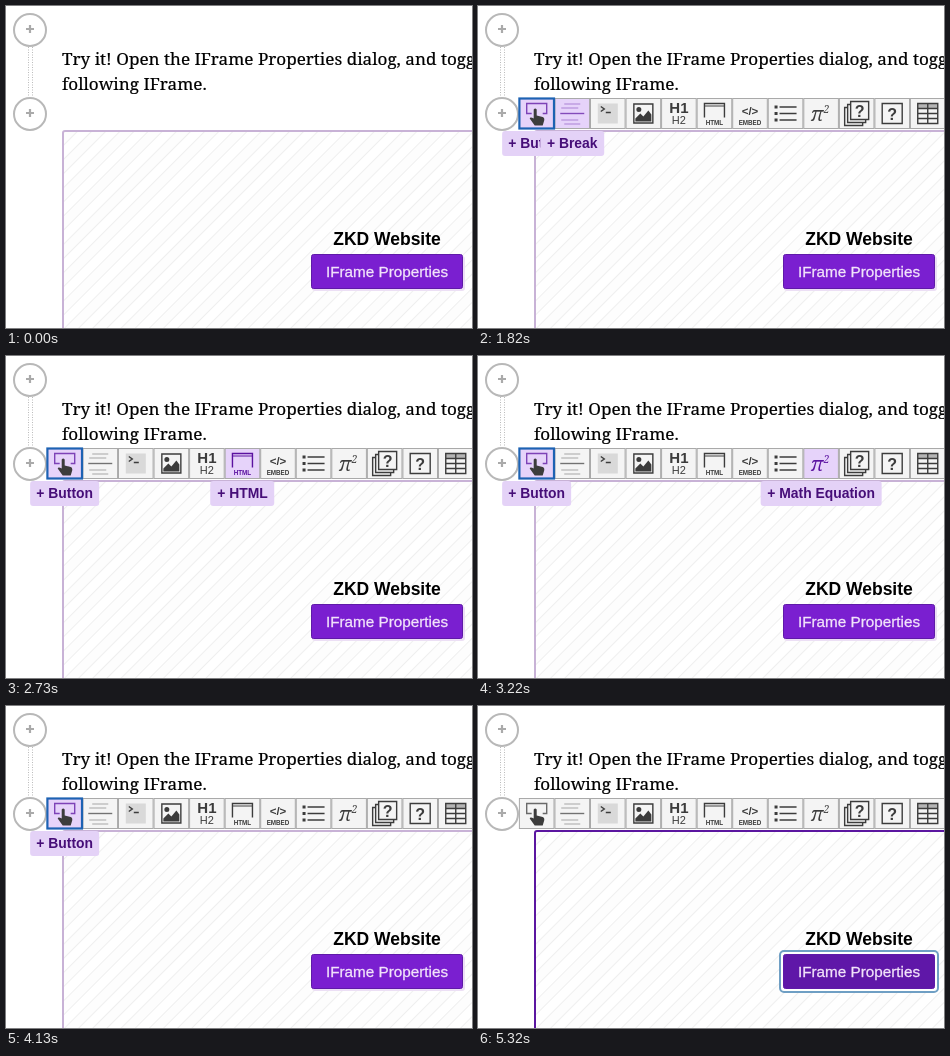
An HTML page for the animation above (5390 ms loop, 466x322 px).

```html
<!DOCTYPE html>
<html lang="en">
<head>
<meta charset="utf-8">
<title>Editor toolbar</title>
<style>
html, body { margin: 0; width: 100%; height: 100%; overflow: hidden; background: #fff; }
#stage { position: absolute; left: 0; top: 0; width: 466px; height: 322px; overflow: hidden; }
svg { position: absolute; left: 0; top: 0; }
.body { font: 17.1px "Noto Serif", serif; fill: #000; stroke: #000; stroke-width: .2; }
.ui { font-family: "Liberation Sans", Arial, sans-serif; text-anchor: middle; }
.tip {
  position: absolute; top: 125px; height: 25px; padding: 0 6.5px; border-radius: 3px;
  transform: translateX(-50%); white-space: nowrap; background: #e4d2f7; color: #460e78;
  font: bold 13.9px/25px "Liberation Sans", Arial, sans-serif;
}
.tool { color: #3c3c3c; }
.tool > rect { fill: #f4f4f4; stroke: #a9a9a9; }
.tool.hot { color: #5b12a0; }
.tool.hot > rect { fill: #e6d3fa; }
.tool.focus > rect { stroke: #1d62b3; stroke-width: 2.2; }
.tool text { fill: currentColor; }
.line { fill: none; stroke: currentColor; stroke-width: 1.4; }
.solid { fill: currentColor; }
.hand { fill: #3c3c3c; }
</style>
</head>
<body>
<div id="stage">
  <svg width="466" height="322" viewBox="0 0 466 322">
    <defs>
      <pattern id="hatch" width="20" height="20" patternUnits="userSpaceOnUse" patternTransform="translate(57 125) rotate(45)">
        <rect width="10" height="20" fill="#fdfdfd"/>
        <path d="M.5 0V20M10.5 0V20" stroke="#efefef"/>
      </pattern>
      <g id="plus">
        <circle r="16" fill="#fff" stroke="#b8b8b8" stroke-width="2"/>
        <path d="M-4-1H4M0-5V3" stroke="#aaa" stroke-width="2.2"/>
      </g>
    </defs>
    <path d="M22.5 41V91M26.5 41V91" stroke="#bbb" stroke-dasharray="1 1.5"/>
    <use href="#plus" x="24" y="24"/>
    <use href="#plus" x="24" y="108"/>
    <text class="body" x="56" y="59">Try it! Open the IFrame Properties dialog, and toggle the</text>
    <text class="body" x="56" y="84">following IFrame.</text>
    <path id="caret" d="M56.5 41V64" stroke="#000"/>
    <rect id="frame" x="57" y="125" width="500" height="260" rx="2" fill="url(#hatch)" stroke-width="2"/>
    <text class="ui" x="381" y="239" font-size="17.5" font-weight="bold">ZKD Website</text>
    <rect id="ring" x="302" y="245" width="158" height="41" rx="4" fill="#fff" stroke="#6f9fc4" stroke-width="2"/>
    <rect id="shade" x="306" y="250" width="153" height="35" rx="3" fill="#ecdff5"/>
    <rect id="action" x="305.5" y="248.5" width="151" height="34" rx="2" stroke="#5f1aa8"/>
    <text class="ui" x="381" y="271" font-size="15.25" fill="#f2e4fa" stroke="#f2e4fa" stroke-width=".3">IFrame Properties</text>
    <g id="bar"></g>
  </svg>
</div>
<script>
const LOOP = 5390, STEP = 70, PITCH = 35.55, FIRST = 58.7;
const $ = id => document.getElementById(id);
const label = (text, y, size, extra = '') =>
  `<text class="ui" y="${y}" font-size="${size}" ${extra}>${text}</text>`;
const line = (d, extra = '') => `<path class="line" d="${d}" ${extra}/>`;
const solid = (d, extra = '') => `<path class="solid" d="${d}" ${extra}/>`;
const bold = 'font-weight="bold"';

// Icons are drawn around the centre of each tool.
const tools = [
  ['Button', line('M-5 0H-10V-10H10V0H6', 'opacity=".75"') +
    '<path class="hand" d="M-3-4Q-1.5-6 0-4V2L6 3.5Q8 4 7.5 7L6 12H-2L-7 5Q-6.5 3-3 5Z"/>'],
  ['Break', line('M-8-9.5H8M-11-5.5H6M-11 6.5H6M-8 10.5H8', 'opacity=".28"') + line('M-12 0H12', 'opacity=".7"')],
  ['Code', solid('M-10-10H10V10H-10Z', 'opacity=".15"') + line('M-7-7L-3.5-4.5L-7-2M-2-1H3')],
  ['Figure', line('M-9.5-9.5H9.5V9.5H-9.5Z', 'stroke-width="2"') +
    solid('M-8 8V5L-3 0L0 3L5-3L8 1V8ZM-7-4A2.5 2.5 0 1 1-2-4A2.5 2.5 0 1 1-7-4')],
  ['Heading', label('H1', -1, 15, bold) + label('H2', 10.5, 11)],
  ['HTML', line('M-10 4V-10H10V4') + line('M-10-7.5H10', 'opacity=".7"') + label('HTML', 11, 6.3, bold)],
  ['IFrame', label('&lt;/&gt;', 1, 11.5, bold) + label('EMBED', 11, 6.3, bold)],
  ['List', line('M-6-6.5H11M-6 0H11M-6 6.5H11') + solid('M-11-8h3v3h-3zM-11-1.5h3v3h-3zM-11 5h3v3h-3z')],
  ['Math Equation', '<text font-family="Noto Serif, serif" font-style="italic" x="-10" y="7" font-size="20">π<tspan font-size="10" dy="-8">2</tspan></text>'],
  ['Question Bank', line('M-6-12H12V6H-6ZM-6-9H-9V9H9V6M-9-6H-12V12H6V9') + label('?', 3, 16, bold + ' x="3"')],
  ['Question', line('M-10-10H10V10H-10Z') + label('?', 6, 16, bold)],
  ['Table', solid('M-10-10H10V-5H-10Z', 'opacity=".35"') + line('M-10-10H10V10H-10ZM-10-5H10M-10 0H10M-10 5H10M0-10V10')]
];

const parts = tools.map(([name, icon], i) => {
  const x = FIRST + i * PITCH;
  const tool = document.createElementNS('http://www.w3.org/2000/svg', 'g');
  tool.classList.add('tool');
  tool.setAttribute('transform', `translate(${x} 107.5)`);
  tool.innerHTML = `<rect x="-17.3" y="-15" width="34.6" height="30"/>${icon}`;
  // Prepending keeps each tool's border above its right neighbour.
  $('bar').prepend(tool);
  const tip = document.createElement('div');
  tip.className = 'tip';
  tip.textContent = '+ ' + name;
  tip.style.left = x + 'px';
  $('stage').append(tip);
  return { tool, tip };
});

// [start time, hovered tool]
const hovers = [[0, -1], [1820, 1], [2100, 2], [2170, 3], [2450, 4], [2730, 5], [2870, 6],
  [3150, 7], [3220, 8], [3430, 9], [3780, 10], [3920, 11], [4060, -1]];

const ramp = (t, start, length) => Math.max(0, Math.min(1, (t - start + STEP) / length));
const show = (el, opacity) => { el.style.opacity = +opacity; };
const mix = (a, b, p) => `rgb(${a.map((v, i) => Math.round(v + (b[i] - v) * p))})`;

function draw(now) {
  const t = Math.floor((now % LOOP) / STEP) * STEP;
  const hover = hovers.filter(([start]) => start <= t).pop()[1];
  const focused = t >= 1470 && t < 5110;
  const pressed = t >= 5110;

  show($('caret'), t >= 910 && t < 1470);
  show($('bar'), ramp(t, 1120, 210));
  parts.forEach(({ tool, tip }, i) => {
    const focus = i === 0 && focused;
    tool.classList.toggle('focus', focus);
    tool.classList.toggle('hot', focus || i === hover);
    show(tip, focus ? ramp(t, 1470, 210) : i === hover);
  });
  $('frame').setAttribute('stroke', mix([200, 178, 214], [91, 22, 160], ramp(t, 4480, 140)));
  $('action').setAttribute('fill', pressed ? '#5f17a8' : '#7a1fd0');
  show($('ring'), pressed);
  show($('shade'), !pressed);
}

const begin = performance.now();
function tick() {
  draw(performance.now() - begin);
  requestAnimationFrame(tick);
}
tick();
</script>
</body>
</html>
```
